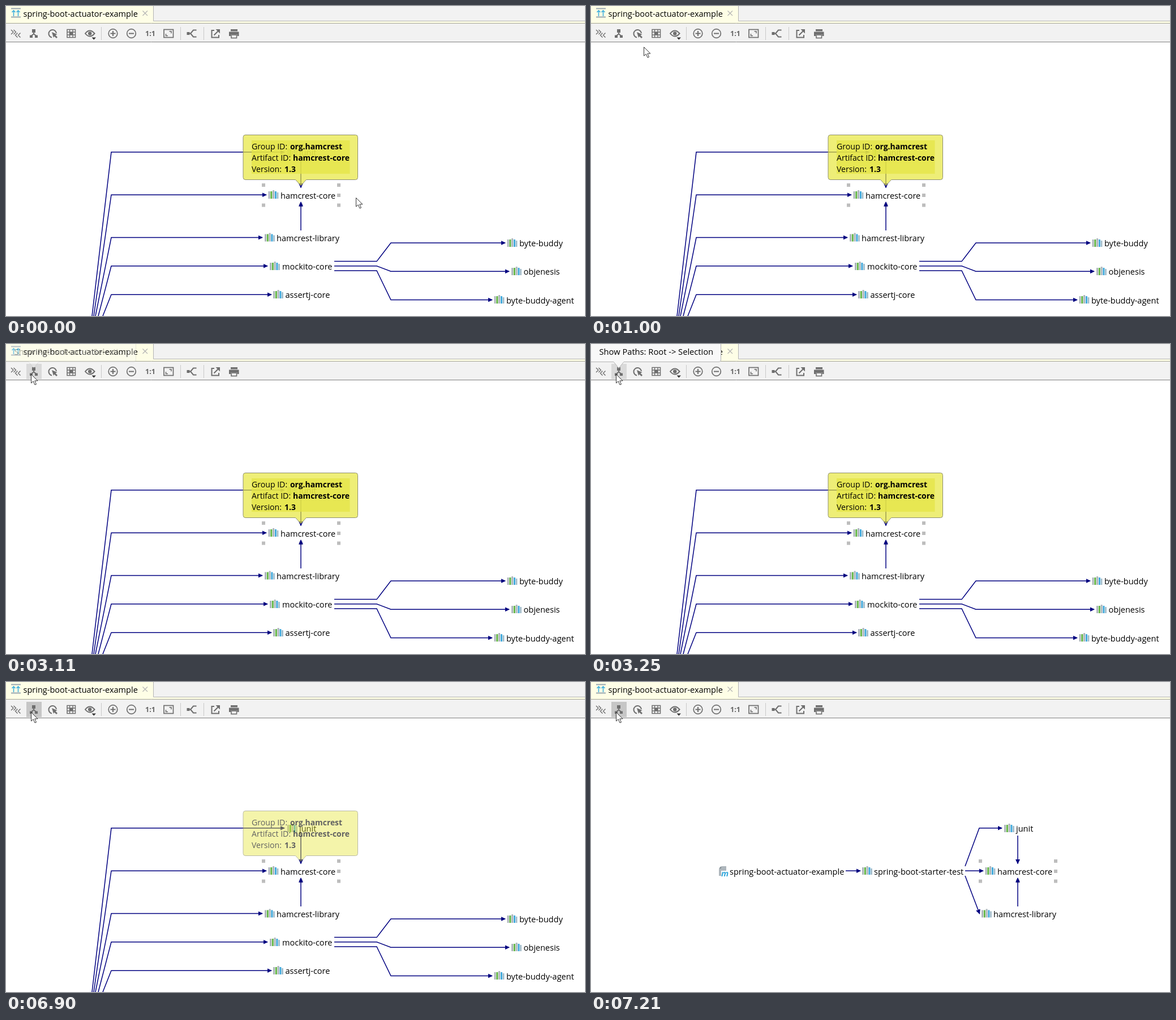
Write an HTML page that moves like this. It is 1023x547 px and loops after 8 s.

```html
<!DOCTYPE html>
<html lang="en">
<head>
<meta charset="utf-8">
<title>Dependency diagram</title>
<style>
  html, body { margin: 0; width: 100%; height: 100%; overflow: hidden; background: #fff; }
  svg { display: block; width: 1023px; height: 547px; }
  text { font: 14.5px "Open Sans", "Noto Sans", sans-serif; fill: #000; }
  .edge { fill: none; stroke: #000080; stroke-width: 1.5; }
  .arrow { marker-end: url(#head); }
  .icon { fill: none; stroke: #6e6e6e; stroke-width: 2; }
  .solid { fill: #6e6e6e; stroke: none; }
  .handle { fill: #bdbdbd; }
  #popup text { font-size: 14.1px; }
  #popup .bold { font-size: 13.9px; font-weight: 700; }
  #tip text { font-size: 14.7px; }

  .anim { animation: 8s step-end infinite; }
  #cursor { animation-name: move; }
  #button { animation-name: press; }
  #tip { animation-name: tip; }
  #popup { animation-name: popup; }
  #inner { animation-name: inner; }
  #click { animation-name: click; }
  #full { animation-name: leave; }
  #paths { animation-name: enter; }
  #shared { animation-name: shift; }

  @keyframes move {
    0% { transform: translate(618px, 338px); }
    1% { transform: translate(618px, 338px); animation-timing-function: steps(3, jump-start); }
    3.8875% { transform: translate(526px, 291px); animation-timing-function: steps(5, jump-start); }
    8.7% { transform: translate(197px, 122px); animation-timing-function: steps(3, jump-start); }
    11.5875% { transform: translate(105px, 75px); }
    12.5% { transform: translate(93px, 72px); }
    16.5% { transform: translate(92px, 71px); }
    21.5% { transform: translate(92px, 71px); animation-timing-function: steps(3, jump-start); }
    24.3125%, 100% { transform: translate(44px, 53px); }
  }
  @keyframes press {
    0% { fill: #f2f2f2; }
    22.4375% { fill: #dadada; }
    84.375%, 100% { fill: #c6c6c6; }
  }
  @keyframes tip {
    0% { opacity: 0; }
    38.875% { opacity: .3; }
    39.75% { opacity: .65; }
    40.625% { opacity: 1; }
    84.375% { opacity: .85; }
    85.375% { opacity: .4; }
    86.25%, 100% { opacity: 0; }
  }
  @keyframes popup {
    0% { opacity: 1; }
    84.375% { opacity: .86; }
    85.375% { opacity: .74; }
    86.25% { opacity: .62; }
    87.625% { opacity: .42; }
    88.5% { opacity: .26; }
    89.25% { opacity: .12; }
    90.125%, 100% { opacity: 0; }
  }
  @keyframes inner { 0% { opacity: .75; } 84.375%, 100% { opacity: 0; } }
  @keyframes click {
    0% { opacity: 0; }
    84.375% { opacity: .65; }
    85.375% { opacity: .35; }
    86.25%, 100% { opacity: 0; }
  }
  @keyframes leave { 0% { opacity: 1; } 87.625%, 100% { opacity: 0; } }
  @keyframes enter { 0% { opacity: 0; } 87.625%, 100% { opacity: 1; } }
  @keyframes shift {
    0% { transform: translate(0, 0); }
    87.625%, 100% { transform: translate(233px, 0); }
  }
</style>
</head>
<body>
<svg viewBox="0 0 1023 547">
  <defs>
    <marker id="head" markerUnits="userSpaceOnUse" markerWidth="9" markerHeight="8" refX="7.5" refY="4" orient="auto">
      <path d="M0 0L8.500 4L0 8Z" fill="#000080"/>
    </marker>
    <g id="lib">
      <path d="M0 3h3v13h-3zM7.6 1h3v15h-3z" fill="#aeb6bc"/>
      <path d="M3.8 3h3v13h-3z" fill="#62b543"/>
      <path d="M11.4 3h3v13h-3z" fill="#40a9dc"/>
      <path d="M15.2 5h2.6v11h-2.6z" fill="#9db9c8"/>
    </g>
  </defs>

  <!-- Diagram with every dependency -->
  <g id="full" class="anim">
    <g class="edge arrow">
      <path d="M152 547L186 257.800H492"/>
      <path d="M155 547L186 333.200H460"/>
      <path d="M158 547L186 408.500H453"/>
      <path d="M163 547L186 458.800H462"/>
      <path d="M171 547L186 509.200H469"/>
      <path d="M580 450.600H655L680 418H882"/>
      <path d="M580 458.800H655L680 468.300H889"/>
      <path d="M580 467H655L680 518.500H859"/>
    </g>
    <use href="#lib" x="466" y="450"/><text x="488" y="465">mockito-core</text>
    <use href="#lib" x="472" y="500"/><text x="493.500" y="515">assertj-core</text>
    <use href="#lib" x="885.500" y="409"/><text x="907" y="424">byte-buddy</text>
    <use href="#lib" x="893" y="459"/><text x="914.500" y="474">objenesis</text>
    <use href="#lib" x="862.500" y="509"/><text x="884" y="524.500">byte-buddy-agent</text>
  </g>

  <!-- Diagram with the paths to the selection -->
  <g id="paths" class="anim" opacity="0">
    <g class="edge arrow">
      <path d="M450 333.200H476"/>
      <path d="M661 325L686 257.800H726"/>
      <path d="M661 333.200H693"/>
      <path d="M661 342L686.600 409"/>
    </g>
    <path d="M231 325H239V342H226V330Z" fill="#aeb6bc"/>
    <path d="M226 329L230 325V329Z" fill="#7f8b91"/>
    <rect x="230" y="333" width="13" height="11" fill="#fff"/>
    <text x="230" y="343" style="font-weight:700;font-style:italic;fill:#35a8dc">m</text>
    <text x="245" y="339.500">spring-boot-actuator-example</text>
    <use href="#lib" x="479" y="324"/><text x="500" y="339.500">spring-boot-starter-test</text>
  </g>

  <g id="shared" class="anim">
    <path class="handle" d="M452 313h6v6h-6zM585 313h6v6h-6zM585 331h6v6h-6zM452 348.500h6v6h-6zM518 348.500h6v6h-6zM585 348.500h6v6h-6z"/>
    <g class="edge arrow">
      <path d="M521 271V320.500"/>
      <path d="M521 396V346"/>
    </g>
    <use href="#lib" x="497" y="249"/><text x="518" y="264">junit</text>
    <use href="#lib" x="463.500" y="324"/><text x="485" y="339.500">hamcrest-core</text>
    <use href="#lib" x="457" y="399.500"/><text x="478" y="415">hamcrest-library</text>
  </g>

  <g id="popup" class="anim">
    <path d="M423 227.500H617.500Q621.500 227.500 621.500 231.500V302.500Q621.500 306.500 617.500 306.500H530.500L521 317L511.500 306.500H423Q419 306.500 419 302.500V231.500Q419 227.500 423 227.500Z" fill="#e6e637" fill-opacity=".68" stroke="#909070"/>
    <rect id="inner" class="anim" x="434" y="237" width="173.500" height="59" fill="#e5e546"/>
    <text x="434" y="252.500">Group ID:</text><text class="bold" x="502" y="252.500">org.hamcrest</text>
    <text x="434" y="272.500">Artifact ID:</text><text class="bold" x="507" y="272.500">hamcrest-core</text>
    <text x="434" y="292.500">Version:</text><text class="bold" x="492" y="292.500">1.3</text>
  </g>

  <!-- Tab strip -->
  <rect width="1023" height="64" fill="#f2f2f2"/>
  <path d="M0 0H260V27H1023V31H0Z" fill="#fefee6"/>
  <path d="M260.500 0V26.500H1023" fill="none" stroke="#b4b4b4"/>
  <path d="M0 30.500H1023" stroke="#a6a694"/>
  <path d="M0 63.500H1023" stroke="#808080"/>
  <g fill="none" stroke-width="1.600">
    <path d="M9 4.500H26M9 19.500H26" stroke="#9aa7b0" stroke-width="2"/>
    <path d="M13.500 18V8M10.500 11L13.500 8L16.500 11M21.500 18V8M18.500 11L21.500 8L24.500 11" stroke="#40b0de"/>
  </g>
  <text x="30.500" y="18.500">spring-boot-actuator-example</text>
  <path d="M241.500 8.500L250 17M250 8.500L241.500 17" stroke="#b5b5b5" stroke-width="1.200"/>

  <!-- Toolbar -->
  <rect id="button" class="anim" x="36" y="35" width="27" height="27" fill="#f2f2f2"/>
  <path d="M168.500 37V60M308.500 37V60M349.500 37V60" stroke="#c8c8c8"/>
  <g class="icon">
    <path d="M9 42L13 46L9 50M13.500 42L17.500 46L13.500 50M20.500 47.500L16.500 51.500L20.500 55.500M25.500 47.500L21.500 51.500L25.500 55.500" stroke-width="1.400"/>
    <path d="M49 46V49L44.500 53M49 49L53.500 53" stroke-width="1.800"/>
    <path class="solid" d="M46 41h6v6h-6zM42 51.500h5v4.500h-5zM51 51.500h5v4.500h-5z"/>
    <path d="M81 55.500A6.800 6.800 0 1 1 89 48"/>
    <path class="solid" d="M81 46L90.500 50L87.500 51.500L91 55L89 57L85.500 53.500L84 56Z"/>
    <rect x="108" y="41.500" width="14.500" height="14" stroke-width="1.500"/>
    <path d="M112.500 41V56M118 41V56M108 46H123M108 51H123" stroke-width="1.400"/>
    <path class="solid" d="M112.500 46h5.500v5h-5.500z"/>
    <path d="M140 48.500Q148 38.500 156.500 48.500Q148 58.500 140 48.500Z"/>
    <circle class="solid" cx="148.200" cy="48.500" r="3.200"/>
    <path d="M151.500 55.500H159L155.200 59.500Z" fill="#333" stroke="none"/>
    <circle cx="189" cy="48.500" r="7.800" stroke-width="1.700"/>
    <path d="M184.500 48.500H193.500M189 44V53"/>
    <circle cx="221.500" cy="48.500" r="7.800" stroke-width="1.700"/>
    <path d="M217 48.500H226"/>
    <rect x="279" y="41.500" width="16.500" height="14" stroke-width="1.700"/>
    <path d="M282.500 49V52.500H286M288.500 44.800H292V48.300" stroke-width="1.500"/>
    <path d="M320 48.500H327M336.500 42.500H331L326 48.500L331 54.500H336.500"/>
    <path class="solid" d="M319.500 46h5v5h-5z"/>
    <path d="M368 43H363.500V55.500H376V51M367.500 51.500L376 43"/>
    <path class="solid" d="M370.500 41H378V48.500Z"/>
    <path class="solid" d="M397 41h12v3.500h-12zM394 45.500h17.500v7.500h-3v-3h-11.500v3h-3z"/>
    <rect x="398" y="51" width="9.500" height="5.500" stroke-width="1.600"/>
  </g>
  <text x="246" y="53" style="font-size:12.500px;font-weight:700;fill:#666">1:1</text>

  <g id="tip" class="anim" opacity="0">
    <path d="M-2 -5H229.500V28Q229.500 31.500 226 31.500H58L49 42.500L40 31.500H-2Z" fill="#f8f8f8" stroke="#b4b4b4"/>
    <text x="14.500" y="18.500">Show Paths: Root -&gt; Selection</text>
  </g>

  <path id="cursor" class="anim" d="M.5 .5V16L4.200 12.700L7 19L9.500 18L6.800 11.900H12Z" fill="#fff" stroke="#333"/>
  <circle id="click" class="anim" cx="45" cy="52.500" r="15" fill="#eee010" opacity="0"/>
</svg>
</body>
</html>
```
